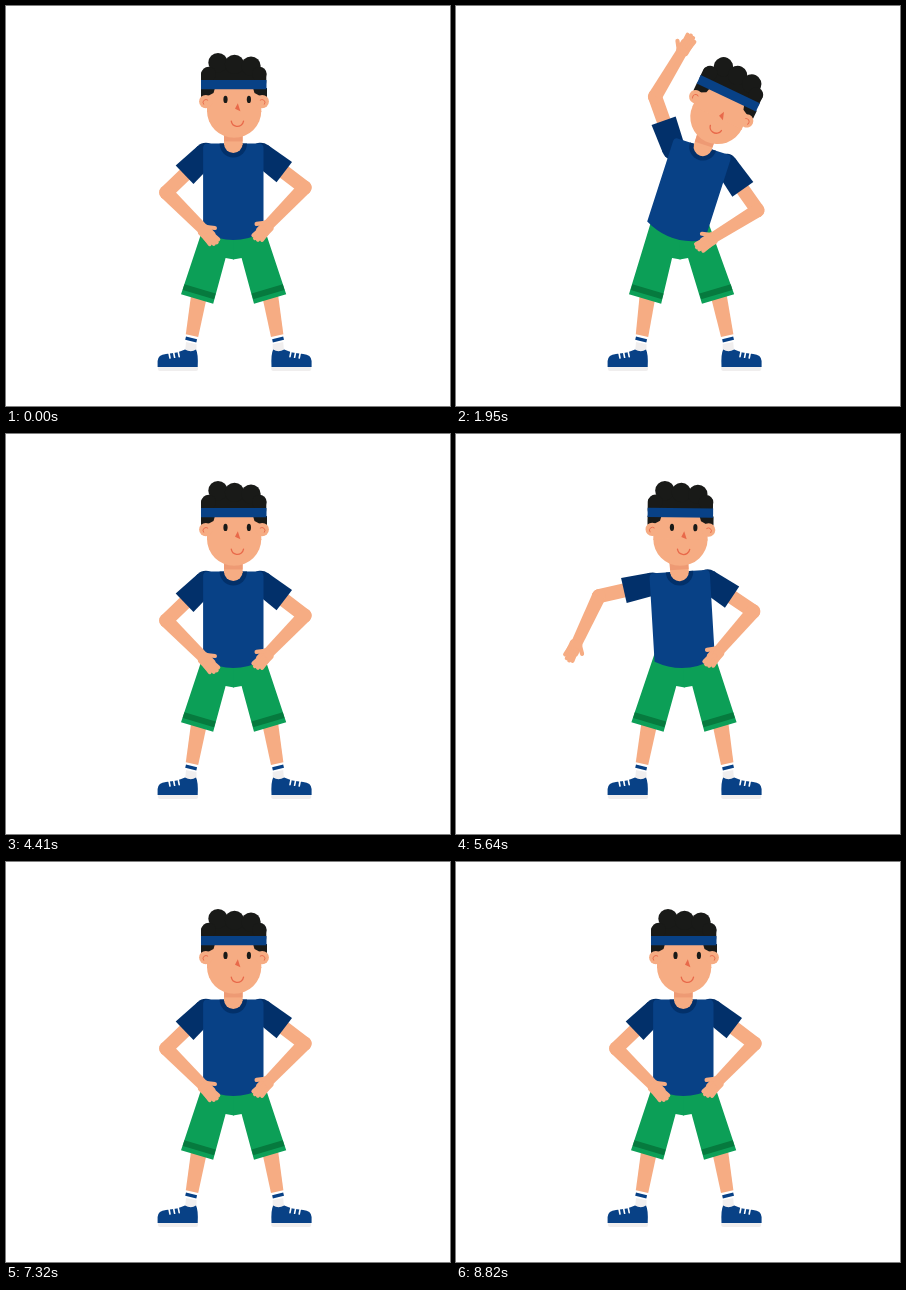
Animation of 444x400 px, one loop 9000 ms. Source, as an HTML page with a canvas:

```html
<!DOCTYPE html>
<html lang="en">
<head>
<meta charset="utf-8">
<title>Side stretch</title>
<style>
  html, body { margin: 0; width: 100%; height: 100%; overflow: hidden; background: #fff; }
  canvas { display: block; width: 444px; height: 400px; }
</style>
</head>
<body>
<canvas id="stage" width="444" height="400"></canvas>
<script>
const ctx = document.getElementById('stage').getContext('2d');
const SKIN = '#f6ac83', SHADE = '#ee9a74', BLUSH = '#e8694a', HAIR = '#191a18', SOLE = '#f0eeee';
const SHIRT = '#084186', SLEEVE = '#02306a', BAND = '#084186', SHORTS = '#0c9f57', CUFF = '#067a3e';
const LOOP = 9000, STEP = 30, START = 90, REP = 1455, REPS = 6;
const UPPER_ARM = 55, FOREARM = 52;
const SIDES = ['left', 'right'];
const REST = { left: { upper: 46, fore: -45 }, right: { upper: 52.8, fore: -44 } };
const RAISED = { upper: 142.5, fore: 193 };

const rad = deg => deg * Math.PI / 180;
const clamp = x => Math.max(0, Math.min(1, x));
const mix = (a, b, x) => a + (b - a) * x;
const progress = (t, from, to) => clamp((t - from) / (to - from));
function ease(t, from, to) {
  const x = progress(t, from, to);
  return x * x * (3 - 2 * x);
}
const bump = (t, from, to) => Math.sin(Math.PI * progress(t, from, to)) ** 2;

function fill(color, draw) {
  ctx.beginPath();
  draw();
  ctx.fillStyle = color;
  ctx.fill();
}
function polygon(color, ...points) {
  fill(color, () => points.forEach(p => ctx.lineTo(...p)));
}
function ellipse(color, x, y, rx, ry = rx, from = 0, to = 2 * Math.PI) {
  fill(color, () => ctx.ellipse(x, y, rx, ry, 0, from, to));
}
function rect(color, x, y, w, h, radius = 0) {
  fill(color, () => ctx.roundRect(x, y, w, h, radius));
}
function stroke(color, width, cap, draw) {
  ctx.beginPath();
  draw();
  ctx.strokeStyle = color;
  ctx.lineWidth = width;
  ctx.lineCap = cap;
  ctx.stroke();
}
function line(color, width, x1, y1, x2, y2, cap = 'round') {
  stroke(color, width, cap, () => {
    ctx.moveTo(x1, y1);
    ctx.lineTo(x2, y2);
  });
}
function arc(color, width, x, y, r, from, to) {
  stroke(color, width, 'round', () => ctx.arc(x, y, r, from, to));
}
function mirrored(axis, draw) {
  ctx.save();
  ctx.translate(2 * axis, 0);
  ctx.scale(-1, 1);
  draw();
  ctx.restore();
}

function leg(shift) {
  polygon(SKIN, [185.5 + shift, 286], [201.5 + shift, 288], [192.2, 331], [179.8, 328.3]);
  polygon(SOLE, [180, 336], [190.5, 338], [190.5, 347], [179, 347]);
  line(BAND, 3.4, 179.6, 332.2, 190.7, 334.8, 'butt');
  rect(SOLE, 152, 360, 40, 5, 2);
  fill(BAND, () => {
    ctx.moveTo(151.6, 361);
    ctx.lineTo(151.6, 355);
    ctx.quadraticCurveTo(152, 348.7, 160, 348);
    ctx.quadraticCurveTo(172, 347, 179, 343.5);
    ctx.quadraticCurveTo(185, 347, 190, 343.5);
    ctx.quadraticCurveTo(192.4, 348, 191.7, 361);
  });
  for (let i = 0; i < 3; i++) line('#fff', 1.6, 163 + 4.6 * i, 347 - 0.7 * i, 164 + 4.6 * i, 352 - 0.7 * i);
}

function shortsHalf(k) {
  fill(SHORTS, () => {
    ctx.moveTo(199 - 4 * k, 216);
    ctx.lineTo(175 - 2 * k, 288.2);
    ctx.lineTo(207.2 - 2 * k, 297.8);
    ctx.lineTo(219.6 - 3.5 * k, 252);
    ctx.lineTo(228 - 3.5 * k, 253.5);
    ctx.lineTo(228 - 4 * k, 216);
  });
  line(CUFF, 6, 177.6 - 2 * k, 281.2, 208.8 - 2 * k, 290.4, 'butt');
}

// Runs draw at the shoulder, with +y pointing down the upper arm.
function atShoulder(side, pose, draw) {
  ctx.save();
  if (side === 'right') ctx.scale(-1, 1);
  ctx.translate(-27.5, -53.7);
  ctx.rotate(rad(pose.upper));
  draw();
  ctx.restore();
}
function upperArm(side, pose) {
  atShoulder(side, pose, () => {
    line(SKIN, 14, 0, 20, 0, UPPER_ARM);
    ellipse(SLEEVE, 0, 0, 11.6);
    polygon(SLEEVE, [-11.6, 0], [11.6, 0], [12.8, 29.5], [-12.8, 29.5]);
  });
}
function forearm(side, pose) {
  atShoulder(side, pose, () => {
    ctx.translate(0, UPPER_ARM);
    ctx.rotate(rad(pose.fore - pose.upper));
    ellipse(SKIN, 0, 0, 7);
    polygon(SKIN, [-7, 0], [7, 0], [5.6, FOREARM], [-5.6, FOREARM]);
    ctx.translate(0, FOREARM);
    rect(SKIN, -6.8, -2, 13, 15, 3);
    line(SKIN, 4.2, 4, 1, 9.3, 7.5);
    for (let i = 0; i < 4; i++) {
      const x = 3.6 - 3.1 * i;
      line(SKIN, 4.2, x * 0.8, 7, x, 18.8 - 0.9 * (i - 1) ** 2);
    }
  });
}

function torso() {
  fill(SHIRT, () => {
    ctx.moveTo(-30.2, 24);
    ctx.lineTo(-30.2, -60);
    ctx.quadraticCurveTo(-30, -64.5, -26, -64.5);
    ctx.lineTo(26, -64.5);
    ctx.quadraticCurveTo(30, -64.5, 30.2, -60);
    ctx.lineTo(30.2, 24);
    ctx.quadraticCurveTo(0, 40, -30.2, 24);
  });
  ellipse(SLEEVE, 0, -64.5, 13.7, 14, 0, Math.PI);
  rect(SKIN, -9.3, -76, 18.6, 13);
  ellipse(SKIN, 0, -64.3, 9.3, 9.4, 0, Math.PI);
  rect(SHADE, -9.3, -76, 18.6, 9.5);
}

function earAndSideburn() {
  polygon(HAIR, [-33, -52], [-19, -52], [-20.5, -47], [-28, -43], [-33, -43]);
  ellipse(SKIN, -28.2, -38.4, 6.7);
  arc(BLUSH, 0.9, -28, -37.5, 3, Math.PI * 0.8, Math.PI * 1.7);
}
function head(eyeOpen) {
  rect(HAIR, -33, -70, 65.3, 16, 4);
  rect(HAIR, -24, -75, 47, 17);
  for (let i = 0; i < 3; i++) ellipse(HAIR, -16 + 16.5 * i, -77.3 + 1.7 * i, 9.7);
  for (const side of [-1, 1]) ellipse(HAIR, side * 25.3, -66, 7.3);
  rect(SKIN, -27, -52, 54.3, 24);
  ellipse(SKIN, 0.15, -29, 27.15, 26.7, 0, Math.PI);
  earAndSideburn();
  mirrored(0, earAndSideburn);
  rect(BAND, -33, -60, 65.5, 9.2);
  if (eyeOpen > 0) for (const side of [-1, 1]) ellipse(HAIR, 3.2 + side * 11.7, -40.6, 2.1, 3.6 * eyeOpen);
  polygon(BLUSH, [3.8, -36.8], [1, -31.2], [6.4, -28.8]);
  arc(BLUSH, 1.3, 3.4, -19.8, 6.2, 0.05 * Math.PI, 0.95 * Math.PI);
}

function poseAt(time) {
  const elapsed = time - START;
  const active = elapsed >= 0 && elapsed < REP * REPS;
  const u = active ? elapsed % REP : 0;
  const [lifting, resting] = Math.floor(elapsed / REP) % 2 ? ['left', 'right'] : ['right', 'left'];
  const sign = lifting === 'left' ? 1 : -1;

  // The torso leads, the arm whips up after it, and the body swings past upright on the way back.
  const lean = 17.8 * (ease(u, 160, 345) - ease(u, 860, 1130)) - 3.4 * bump(u, 1000, 1380);
  const nod = 7.6 * (ease(u, 320, 400) - ease(u, 1080, 1300));
  const upper = ease(u, 220, 390) - ease(u, 870, 1400);
  const fore = ease(u, 210, 355) - ease(u, 870, 1370);
  const fromBlink = lifting === 'left' ? Math.abs(u - 405) : LOOP;
  return {
    tilt: sign * lean,
    headTilt: sign * nod,
    eyeOpen: progress(fromBlink, 20, 90),
    [lifting]: {
      upper: mix(REST[lifting].upper, RAISED.upper, upper),
      fore: mix(REST[lifting].fore, RAISED.fore, fore)
    },
    [resting]: { upper: REST[resting].upper, fore: REST[resting].fore + 0.2 * lean }
  };
}

function draw(time) {
  const pose = poseAt(time), k = pose.tilt / 17.5;
  ctx.fillStyle = '#fff';
  ctx.fillRect(0, 0, 444, 400);
  leg(-1.5 * k);
  mirrored(228.6, () => leg(1.5 * k));
  shortsHalf(k);
  mirrored(227.6, () => shortsHalf(-k));
  ctx.save();
  ctx.translate(227.3, 202);
  ctx.rotate(rad(pose.tilt));
  SIDES.forEach(side => upperArm(side, pose[side]));
  torso();
  SIDES.forEach(side => forearm(side, pose[side]));
  ctx.translate(0.7, -68);
  ctx.rotate(rad(pose.headTilt));
  head(pose.eyeOpen);
  ctx.restore();
}

function tick() {
  const time = performance.now() % LOOP;
  draw(time - time % STEP);
  requestAnimationFrame(tick);
}
tick();
</script>
</body>
</html>
```
